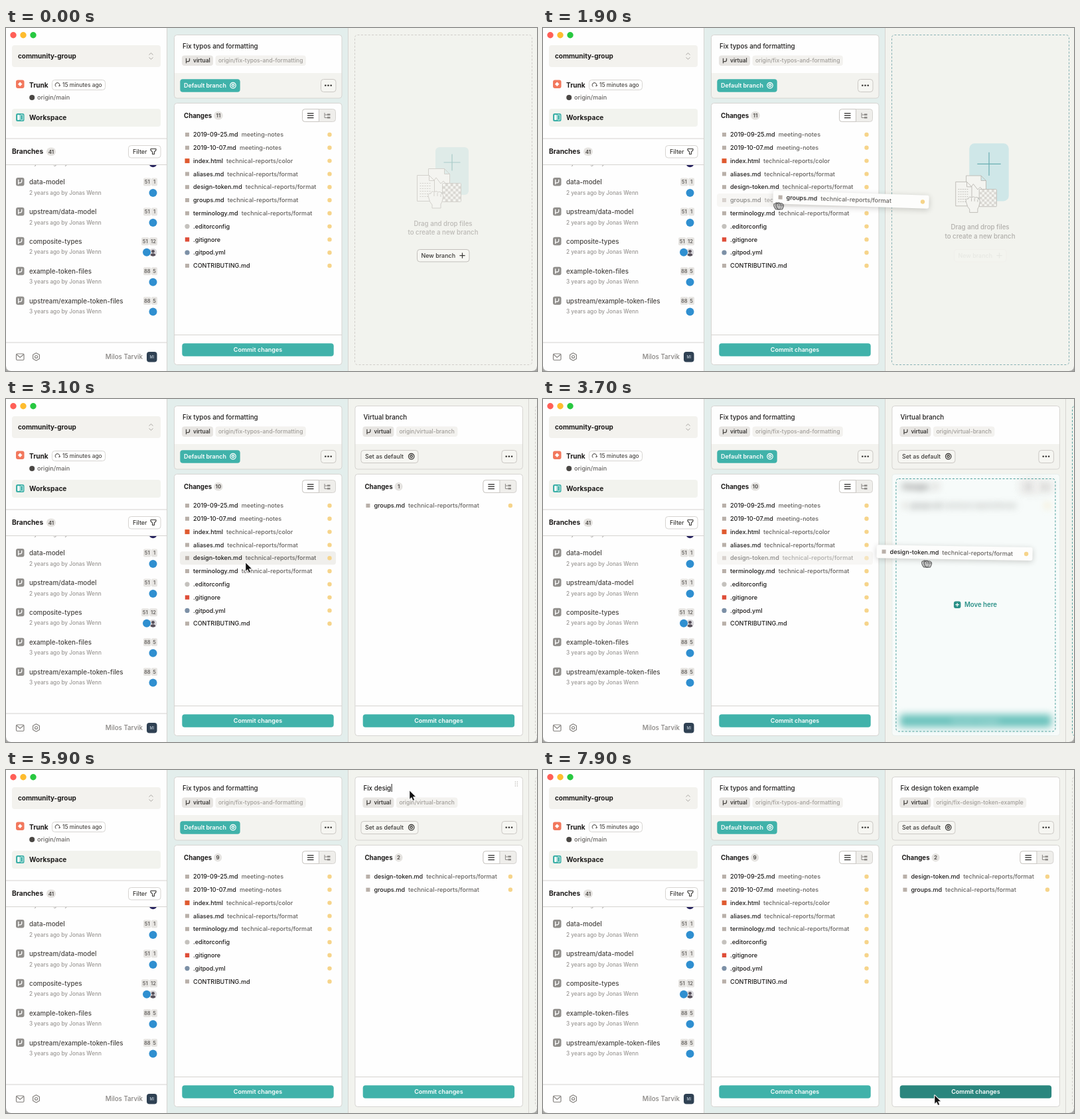
Animation, 800 px wide and 518 px high, one loop 8 s. Source, as an HTML page with a canvas:

```html
<!DOCTYPE html>
<html lang="en">
<head>
<meta charset="utf-8">
<title>Branch lanes</title>
<style>
html, body { margin: 0; width: 100%; height: 100%; overflow: hidden; background: #fff; }
canvas { display: block; width: 800px; height: 518px; }
</style>
</head>
<body>
<canvas id="stage"></canvas>
<script>
const W = 800, H = 518, LOOP = 8000, LANE = 272.4;
const cv = document.getElementById('stage');
const dpr = window.devicePixelRatio || 1;
cv.width = W * dpr;
cv.height = H * dpr;
const c = cv.getContext('2d');

const LINE = '#d6d4d1', INK = '#1d1b1a', MID = '#666360', TEAL = '#40b2aa', DEEP = '#2a9087';
const PERSON = 'Jonas Wenn', USER = 'Milos Tarvik';

const FILES = [
  ['2019-09-25.md', 'meeting-notes'],
  ['2019-10-07.md', 'meeting-notes'],
  ['index.html', 'technical-reports/color'],
  ['aliases.md', 'technical-reports/format'],
  ['design-token.md', 'technical-reports/format'],
  ['groups.md', 'technical-reports/format'],
  ['terminology.md', 'technical-reports/format'],
  ['.editorconfig', ''],
  ['.gitignore', ''],
  ['.gitpod.yml', ''],
  ['CONTRIBUTING.md', '']
];
const TOKEN = FILES[4], GROUPS = FILES[5];

const DRAG1 = 1820, DROP1 = 2580, DRAG2 = 3440, DROP2 = 4280;
const TYPE0 = 5600, TYPE1 = 6450, SAVED = 6600;
const NEW_TITLE = 'Fix design token example';

// [time, x, y]
const cursorPath = [
  [750, 600, 440], [1450, 332, 263], [1780, 330, 263], [1900, 350, 265],
  [2250, 580, 248], [2450, 620, 242], [2640, 620, 242], [2900, 390, 248],
  [3060, 361, 247], [3150, 361, 247], [3280, 345, 244], [3430, 345, 244],
  [3700, 573, 245], [3950, 640, 256], [4250, 648, 258], [4650, 652, 255],
  [5000, 698, 110], [5150, 690, 52], [5380, 608, 31], [6500, 608, 31],
  [6780, 716, 170], [6900, 725, 254], [7150, 705, 380], [7600, 594, 488],
  [7800, 590, 491], [8000, 590, 491]
];
const cardPath1 = [[DRAG1, 0, 0], [1900, 84, -1], [2250, 250, -12], [2450, 290, -18], [DROP1, 290, -18]];
const cardPath2 = [[DRAG2, 0, 0], [3700, 240, -8], [3950, 294, 10], [4200, 302, 14], [DROP2, 302, 14]];

const ramp = (t, a, b) => Math.max(0, Math.min(1, (t - a) / (b - a)));
const inside = (t, a, b) => t >= a && t < b;

// Smooth curve through timed points
function along(path, t) {
  const n = path.length;
  if (t <= path[0][0]) return path[0].slice(1);
  if (t >= path[n - 1][0]) return path[n - 1].slice(1);
  let i = 0;
  while (path[i + 1][0] <= t) i++;
  const a = path[i], b = path[i + 1], d = b[0] - a[0], u = (t - a[0]) / d;
  const slope = (j, k) => {
    const p = path[j - 1], q = path[j], r = path[j + 1];
    if (!p || !r || (q[k] - p[k]) * (r[k] - q[k]) <= 0) return 0;
    return (r[k] - p[k]) / (r[0] - p[0]);
  };
  return [1, 2].map(k => {
    const u2 = u * u, u3 = u2 * u;
    return (2 * u3 - 3 * u2 + 1) * a[k] + (u3 - 2 * u2 + u) * d * slope(i, k)
      + (3 * u2 - 2 * u3) * b[k] + (u3 - u2) * d * slope(i + 1, k);
  });
}

function box(x, y, w, h, r, fill, stroke, lw = 1) {
  c.beginPath();
  c.roundRect(x, y, w, h, r);
  if (fill) { c.fillStyle = fill; c.fill(); }
  if (stroke) { c.strokeStyle = stroke; c.lineWidth = lw; c.stroke(); }
}
function dot(x, y, r, fill) {
  c.beginPath();
  c.arc(x, y, r, 0, 7);
  c.fillStyle = fill;
  c.fill();
}
function ring(x, y, r, stroke, lw = 1.2, a = 0, b = 7) {
  c.beginPath();
  c.arc(x, y, r, a, b);
  c.strokeStyle = stroke;
  c.lineWidth = lw;
  c.stroke();
}
function stroke(d, color, lw = 1, fill) {
  const p = new Path2D(d);
  if (fill) { c.fillStyle = fill; c.fill(p); }
  c.strokeStyle = color;
  c.lineWidth = lw;
  c.stroke(p);
}
function rect(x, y, w, h, color) {
  c.fillStyle = color;
  c.fillRect(x, y, w, h);
}
function txt(s, x, cy, size, weight, color, align = 'left') {
  c.font = `${weight} ${size}px Inter, Roboto, sans-serif`;
  c.textAlign = align;
  c.fillStyle = color;
  c.fillText(s, x, cy + size * 0.36);
  return c.measureText(s).width;
}
function at(x, y, draw, alpha = 1) {
  c.save();
  c.translate(x, y);
  c.globalAlpha *= alpha;
  draw();
  c.restore();
}
function dashed(x, y, w, h, color) {
  c.save();
  c.setLineDash([3, 2.4]);
  box(x, y, w, h, 4, null, color);
  c.restore();
}

function branchGlyph(x, y, color) {
  stroke(`M${x - 2.5} ${y + 4}V${y - 3.5}M${x - 2.5} ${y + 1.5}H${x}Q${x + 2.5} ${y + 1.5} ${x + 2.5} ${y - 1}V${y - 3.5}`, color, 1.3);
}

function silhouette(x, y) {
  c.save();
  c.beginPath();
  c.arc(x, y, 6, 0, 7);
  c.clip();
  rect(x - 6, y - 6, 12, 12, '#d9d8dc');
  dot(x, y - 1.5, 2.4, '#57505a');
  dot(x, y + 5.5, 4, '#57505a');
  c.restore();
}

function branchItem(y, name, years, a, b, pair) {
  box(15, y - 6.5, 12.5, 12.5, 3, '#918f8c');
  branchGlyph(21.2, y - 0.2, '#fff');
  txt(name, 35, y, 9.75, 500, '#474441');
  const w = b.length > 1 ? 12 : 9;
  box(216 - w, y - 6, 11.5, 12, 2, '#e7e5e2');
  box(228 - w, y - 6, w, 12, 2, '#e7e5e2');
  txt(a, 221.8 - w, y, 7.6, 600, MID, 'center');
  txt(b, 228 - w / 2, y, 7.6, 600, MID, 'center');
  txt(`${years} years ago by ${PERSON}`, 35, y + 16.2, 8.25, 500, '#9a9794');
  if (pair) silhouette(221.5, y + 16.5);
  dot(pair ? 212 : 221.5, y + 16.5, 6, '#2f8fd0');
}

function sidebar() {
  rect(0, 0, 242, H, '#fefefe');
  ['#ff5f57', '#febc2e', '#28c840'].forEach((k, i) => dot(11 + 15 * i, 10.8, 4.7, k));

  box(9, 26, 224, 33, 4, '#f3f2ee');
  txt('community-group', 18, 42.5, 9.95, 700, INK);
  stroke('M215.5 40.5L218.5 37.8L221.5 40.5M215.5 44.5L218.5 47.2L221.5 44.5', '#aaa7a3');

  box(15, 78.5, 12.5, 12.5, 3, '#f2785d');
  stroke('M21.2 81.8L24.2 84.8L21.2 87.8L18.2 84.8Z', '#fff', 0.5, '#fff');
  txt('Trunk', 35, 86, 10.1, 700, INK);
  box(69.5, 78.5, 80, 15, 4, '#fff', LINE);
  ring(77.5, 86, 3.2, MID, 1.1, 2.2, 6.6);
  stroke('M79 87.2L80.9 88L81.7 86', MID);
  txt('15 minutes ago', 85, 86, 8.35, 500, '#4a4744');
  dot(39.2, 105, 4, '#4a4744');
  txt('origin/main', 47, 105, 9.15, 500, MID);

  box(9, 122, 224, 27, 4, '#f2f3ee');
  box(15, 129, 12.5, 12, 2.5, '#3bafa6');
  box(17.2, 131, 3.5, 8, 1, '#fff');
  box(22, 131, 3.5, 8, 1, null, '#fff', 0.8);
  txt('Workspace', 35, 135, 10.15, 700, INK);

  rect(0, 166.5, 242, 1, LINE);
  txt('Branches', 9, 186.5, 10.2, 700, INK);
  box(61, 180.5, 14, 12.5, 6.2, '#e5e3e0');
  txt('41', 68, 186.7, 8, 600, '#4a4744', 'center');
  box(184.5, 177.5, 48.5, 18.5, 4, '#fff', LINE);
  txt('Filter', 191, 186.5, 8.95, 500, '#3a3836');
  stroke('M218 182.5H226V184.5L223.4 187.2V190.5H220.6V187.2L218 184.5Z', '#3a3836', 1.1);

  c.save();
  c.beginPath();
  c.rect(0, 207, 242, 268);
  c.clip();
  txt(`2 years ago by ${PERSON}`, 35, 204, 8.25, 500, '#9a9794');
  dot(221.5, 204.3, 6, '#26235e');
  branchItem(232.5, 'data-model', 2, '51', '1');
  branchItem(277.5, 'upstream/data-model', 2, '51', '1');
  branchItem(322.3, 'composite-types', 2, '51', '12', true);
  branchItem(367.2, 'example-token-files', 3, '88', '5');
  branchItem(412, 'upstream/example-token-files', 3, '88', '5');
  c.restore();
  rect(0, 206, 242, 1, LINE);
  rect(0, 474.5, 242, 1, LINE);

  box(15.5, 492, 11.5, 9.5, 1.5, null, '#85827f', 1.2);
  stroke('M16 493L21.2 497.5L26.5 493', '#85827f', 1.1);
  stroke('M45.5 490.8L50.4 493.6V499.4L45.5 502.2L40.6 499.4V493.6Z', '#85827f', 1.2);
  ring(45.5, 496.5, 2, '#85827f');
  txt(USER, 206, 496.5, 9.75, 500, '#85827f', 'right');
  box(212, 489, 15.5, 15.5, 4, '#2f4153');
  txt('MI', 219.7, 497, 5.6, 500, '#b9c6d2', 'center');
  rect(242, 0, 1, H, LINE);
}

function fileIcon(name, x, y) {
  if (name.endsWith('.md')) rect(x - 3, y - 3, 6, 6, '#b9b0a9');
  else if (name.endsWith('.html')) rect(x - 3.5, y - 3.5, 7, 7, '#df5a30');
  else if (name === '.gitignore') rect(x - 3.2, y - 3.2, 6.4, 6.4, '#de4d38');
  else dot(x, y, 3.6, name === '.gitpod.yml' ? '#7c90a6' : '#c4c1bd');
}

// Row drawn around its own centre, 235 wide
function fileRow(file) {
  fileIcon(file[0], -106.5, 0);
  const w = txt(file[0], -97.5, 0, 9.05, 500, INK);
  if (file[1]) txt(file[1], -97.5 + w + 5, 0, 9.05, 500, MID);
  dot(108, 0, 3.2, '#f6d48a');
}

function target(x, y, color) {
  ring(x, y, 4.2, color, 1.3);
  ring(x, y, 1.7, color, 1.3);
}

function commitButton(color) {
  box(265.3, 476.2, 228.4, 19.6, 4, color);
  txt('Commit changes', 379.5, 486, 9, 600, '#fff', 'center');
}

function laneHeader(o) {
  box(253.5, 10.5, 252.5, 95.5, 4, '#fefefe');
  box(253.5, 68, 252.5, 38, [0, 0, 4, 4], '#f3f3ef');
  box(253.5, 10.5, 252.5, 95.5, 4, null, LINE);
  const tw = txt(o.title, 266, 27.2, 9.75, 500, INK);
  if (o.caret) rect(266.5 + tw, 21, 1, 12, INK);
  if (o.grip) for (let i = 0; i < 6; i++) dot(495 + (i % 2) * 3, 18 + (i >> 1) * 3, 0.8, '#bbb8b4');
  box(265, 41.5, 47, 15.5, 4, '#e7e5e2');
  branchGlyph(274, 49.2, '#4a4744');
  txt('virtual', 282, 49.2, 8.4, 600, '#3a3836');
  c.font = '500 8.45px Inter, Roboto, sans-serif';
  box(315.5, 41.5, c.measureText(o.ref).width + 9, 15.5, 4, '#f3f2ef');
  txt(o.ref, 320, 49.2, 8.45, 500, '#a09d99');
  if (o.main) {
    box(262.3, 77.2, 90.4, 19.6, 4, TEAL);
    txt('Default branch', 268, 86.7, 8.95, 600, '#fff');
    target(342, 86.7, '#fff');
  } else {
    box(262.5, 77.5, 86, 19, 4, '#f6f6f2', '#cbc8c4');
    txt('Set as default', 268.5, 86.7, 8.9, 500, '#3a3836');
    target(338.3, 86.7, '#3a3836');
  }
  box(474.5, 77.5, 22.5, 19, 4, '#f6f6f2', '#cbc8c4');
  for (let i = 0; i < 3; i++) dot(481.3 + i * 4.2, 86.8, 1.3, '#3a3836');
}

function changesBody(o) {
  const w = txt('Changes', 268, 132.3, 9.7, 700, INK);
  const n = String(o.files.length), bw = n.length > 1 ? 13.5 : 12;
  box(268 + w + 3, 126, bw, 12.5, 6, '#e5e3e0');
  txt(n, 271 + w + bw / 2, 132.4, 8, 600, '#4a4744', 'center');

  box(446.5, 122.5, 50, 19, 4, '#efeeeb', LINE);
  box(446.5, 122.5, 25, 19, [4, 0, 0, 4], '#fff', '#c9c6c2');
  for (let i = 0; i < 3; i++) rect(454, 128.4 + i * 3.3, 9.5, 1.2, INK);
  stroke('M480 128V135.5H484M480 131H484', '#8d8a87');
  rect(484, 129.5, 4.5, 2.6, '#8d8a87');
  rect(484, 134, 4.5, 2.6, '#8d8a87');

  o.files.forEach((f, i) => at(379.5, 161 + 19.8 * i, () => {
    if (f === o.hover) box(-117.5, -10, 235, 20, 4, '#f0efec');
    if (f === o.lifted) {
      box(-117.5, -10, 235, 20, 4, '#f7f6f4');
      c.globalAlpha = 0.5;
    }
    fileRow(f);
  }));
  commitButton(o.press ? '#2a867e' : TEAL);
}

function lane(o) {
  laneHeader(o);
  if (!o.dropping) {
    box(253.5, 113.5, 252.5, 395, 4, '#fefefe', LINE);
    rect(254, 463, 252, 1, LINE);
    changesBody(o);
    return;
  }
  box(253.5, 113.5, 252.5, 395, 4, '#f7fbfa', '#e8eeeb');
  c.save();
  c.beginPath();
  c.rect(253, 113, 253, 395);
  c.clip();
  c.filter = `blur(${5.5 * dpr}px)`;
  c.globalAlpha = 0.75;
  changesBody(o);
  c.restore();
  dashed(259.5, 120.5, 240, 381.5, '#4d9f9c');
  box(346.5, 305.5, 10.5, 10.5, 3, DEEP);
  stroke('M351.7 308V313.5M349 310.7H354.5', '#fff', 1.2);
  txt('Move here', 362.5, 310.8, 9.65, 600, DEEP);
}

function paper(x, y, w, h, line, lines) {
  const f = 8;
  stroke(`M${x} ${y}H${x + w - f}L${x + w} ${y + f}V${y + h}H${x}ZM${x + w - f} ${y}V${y + f}H${x + w}`, line, 1, '#f4f4f0');
  c.setLineDash([2, 1.5]);
  for (let i = 0; i < lines; i++) stroke(`M${x + 4} ${y + 12 + i * 4}H${x + w - 6}`, line, 1);
  c.setLineDash([]);
}

function emptyLane(p) {
  dashed(525.5, 10.5, 267, 498, p > 0 ? '#86b0b3' : '#d0cdc9');
  const mix = (a, b) => a + (b - a) * p;
  const line = p > 0.5 ? '#bdbbb6' : '#d3d1cc';
  box(mix(647, 642), mix(180, 174), mix(50, 60), mix(72, 88), mix(6, 8), p > 0.5 ? '#cfe7e8' : '#dfebe8');
  const r = mix(12.5, 18), px = 672, py = mix(203, 205.5);
  stroke(`M${px} ${py - r}V${py + r}M${px - r} ${py}H${px + r}`, p > 0.5 ? '#69aeb2' : '#a9ccc9', 1.2);
  at(653, 272 + 7 * p, () => {
    c.scale(mix(1, 0.93), mix(1, 0.93));
    c.translate(-653, -272);
    paper(636.5, 212.5, 32, 36, line, 0);
    stroke('M640 237L648 226L655 235L659 231L665 238', line);
    box(657.5, 234.5, 28, 28, 1, '#f4f4f0', line);
    for (let i = 0; i < 49; i++) {
      if (i % 2) rect(658 + (i % 7) * 3.9, 235 + Math.floor(i / 7) * 3.9, 3.9, 3.9, '#d9d7d2');
    }
    paper(619.5, 222.5, 26, 39, line, 6);
    stroke('M637 257Q634 249 640 250Q641 245 645 248Q648 245 651 248Q655 246 656 250Q660 251 658 258Q657 264 655 266V272H642V267Q638 263 637 257ZM645 249V254M650 249V254M655 251V255', line, 1, '#f4f4f0');
  });
  const color = p > 0.5 ? '#b0aeaa' : '#bbb9b5', drop = 5.7 * p;
  txt('Drag and drop files', 658.5, 295.2 + drop, 9.7, 500, color, 'center');
  txt('to create a new branch', 658.5, 308.8 + drop, 9.7, 500, color, 'center');
  at(0, 0, () => {
    box(619.5, 334.5, 78.5, 18.5, 4, '#f7f7f3', '#c2bfbb');
    txt('New branch', 625.5, 343.6, 8.95, 500, '#3a3836');
    stroke('M687.5 339.5V347.7M683.4 343.6H691.6', '#3a3836', 1.2);
  }, 1 - p);
}

function dragCard(file, row, path, t, angle) {
  const [dx, dy] = along(path, t);
  at(379.5 + dx, 161 + 19.8 * row + dy, () => {
    c.rotate(angle * ramp(t, path[0][0], path[0][0] + 60));
    c.shadowColor = 'rgba(40,35,30,.22)';
    c.shadowBlur = 9 * dpr;
    c.shadowOffsetY = 2 * dpr;
    box(-117.5, -10, 235, 20, 3, '#fdfdfc');
    c.shadowColor = 'transparent';
    fileRow(file);
  });
}

function arrow() {
  stroke('M0 0V13.2L3 10.4L5.1 15.3L7.4 14.3L5.3 9.6H9.4Z', '#fff', 1.6);
  stroke('M0 0V13.2L3 10.4L5.1 15.3L7.4 14.3L5.3 9.6H9.4Z', '#fff', 0.5, '#111');
}
function fist() {
  stroke('M-1 4Q-2 0 1 0Q3 -2 5 0Q8 -1 9 1Q11 2 10 5Q9 8 8 9H2Q0 7 -1 4Z', '#222', 1.2, '#b4b4b4');
  stroke('M3 1V3.5M6 1V3.5M8.5 2V4', '#222', 0.8);
}

// The pointer smears along its path while it moves fast
function cursor(t) {
  if (t < 750) return;
  const hold = inside(t, DRAG1 - 60, DROP1) || inside(t, DRAG2 - 60, DROP2);
  const half = hold ? 3 : 10;
  const a = along(cursorPath, t - half), b = along(cursorPath, t + half);
  const dist = Math.hypot(b[0] - a[0], b[1] - a[1]);
  const n = Math.min(9, 1 + Math.floor(dist / 2));
  const fade = ramp(t, 750, 950);
  for (let i = 0; i < n; i++) {
    const s = n > 1 ? (i / (n - 1) * 2 - 1) * half : 0;
    const [x, y] = along(cursorPath, t + s);
    at(x, y, hold ? fist : arrow, fade * (n > 1 ? 1.6 / (n + 0.6) : 1));
  }
}

function draw(t) {
  c.setTransform(dpr, 0, 0, dpr, 0, 0);
  c.lineJoin = 'round';
  rect(0, 0, W, H, '#f2f3ee');
  rect(243, 0, 272, H, '#e3eeec');
  rect(515, 0, 1, H, LINE);
  sidebar();

  const drag1 = inside(t, DRAG1, DROP1), drag2 = inside(t, DRAG2, DROP2);
  const split = t >= DROP1, moved = t >= DROP2;
  let hover = null;
  if (inside(t, 1380, DRAG1)) hover = GROUPS;
  if (inside(t, 3000, DRAG2)) hover = TOKEN;
  lane({
    title: 'Fix typos and formatting',
    ref: 'origin/fix-typos-and-formatting',
    main: true,
    files: FILES.filter(f => !(split && f === GROUPS) && !(moved && f === TOKEN)),
    hover,
    lifted: drag1 ? GROUPS : drag2 ? TOKEN : null
  });

  if (split) {
    rect(787, 0, 1, H, LINE);
    dashed(797.5, 10.5, 267, 498, drag2 ? '#4d9f9c' : '#d0cdc9');
    const typed = Math.ceil(NEW_TITLE.length * ramp(t, TYPE0, TYPE1));
    at(LANE, 0, () => lane({
      title: typed ? NEW_TITLE.slice(0, typed) : 'Virtual branch',
      ref: t >= SAVED ? 'origin/fix-design-token-example' : 'origin/virtual-branch',
      files: moved ? [TOKEN, GROUPS] : [GROUPS],
      caret: inside(t, 5450, SAVED),
      grip: inside(t, 4980, 6620),
      dropping: drag2,
      press: t >= 7560
    }));
  } else {
    emptyLane(drag1 ? ramp(t, DRAG1, 1906) : 0);
  }

  if (drag1) dragCard(GROUPS, 5, cardPath1, t, 0.032);
  if (drag2) dragCard(TOKEN, 4, cardPath2, t, 0.016);
  cursor(t);

  stroke('M800 511A7 7 0 0 1 793 518H800Z', '#a9a9a6', 0.2, '#a9a9a6');
  stroke('M0 511A7 7 0 0 0 7 518H0Z', '#a9a9a6', 0.2, '#a9a9a6');
}

const start = performance.now();
function frame() {
  draw((performance.now() - start) % LOOP);
  requestAnimationFrame(frame);
}
frame();
</script>
</body>
</html>
```
